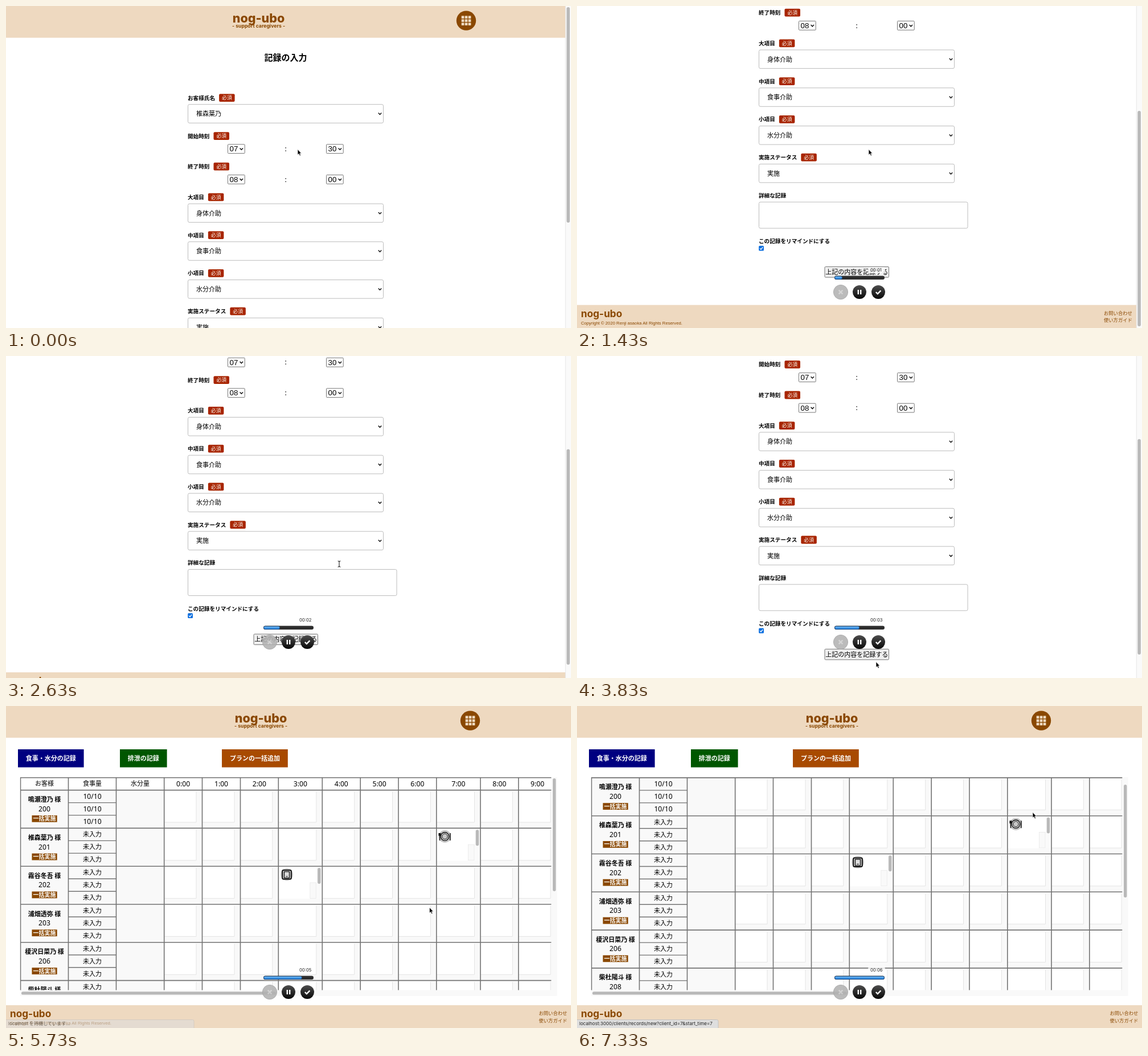
An HTML page that plays this animation: 992x565 px, repeating every 7.36 s.

```html
<!DOCTYPE html>
<html lang="ja">
<head>
<meta charset="utf-8">
<style>
html, body { margin: 0; width: 100%; height: 100%; overflow: hidden; background: #fff; }
svg { display: block; width: 992px; height: 565px; }
text { font-family: "Noto Sans CJK JP", "Noto Sans", sans-serif; white-space: pre; }
.b { font-weight: 700; }
.brand { font-family: Inter, sans-serif; font-weight: 800; }
.ui { font-family: Inter, "Noto Sans CJK JP", sans-serif; }
.latin { font-family: "Liberation Sans", "Noto Sans CJK JP", sans-serif; }
.num { font-family: "Noto Sans", "Noto Sans CJK JP", sans-serif; }
</style>
</head>
<body>
<svg id="stage" viewBox="0 0 992 565" xmlns="http://www.w3.org/2000/svg"></svg>
<script>
const LOOP = 7360, PAGE_SWITCH = 5600;
const BEIGE = '#eed9c0', BROWN = '#8a4800', RULE = '#737373';
const BRAND = 'nog-ubo';

const rect = (x, y, w, h, fill, more = '') =>
  `<rect x="${x}" y="${y}" width="${w}" height="${h}" fill="${fill}" ${more}/>`;
const text = (s, x, y, size, more = '') =>
  `<text x="${x}" y="${y}" font-size="${size}" ${more}>${s}</text>`;
const mid = (s, x, y, size, more = '') => text(s, x, y, size, `text-anchor="middle" ${more}`);
const path = (d, stroke, width = 1, more = '') =>
  `<path d="${d}" fill="none" stroke="${stroke}" stroke-width="${width}" ${more}/>`;
const group = (id, body, more = '') => `<g id="${id}" ${more}>${body}</g>`;
const times = (n, fn) => Array.from({ length: n }, (_, i) => fn(i)).join('');
const chevron = (x, y) => path(`M${x - 2.7} ${y - 1.4}l2.7 2.8 2.7-2.8`, '#111', 1.5);

// Shared header and footer
function header(width, logoX, menuX) {
  return rect(0, 0, width, 55.7, BEIGE) +
    mid(BRAND, logoX, 29, 21.5, `class="brand" fill="${BROWN}"`) +
    mid('- support caregivers -', logoX, 38.3, 8.7, `class="ui b" fill="${BROWN}"`) +
    `<circle cx="${menuX}" cy="25.6" r="17.2" fill="${BROWN}"/>` +
    times(9, i => rect(menuX - 8.3 + i % 3 * 6, 17.3 + Math.floor(i / 3) * 6, 4.7, 4.7, BEIGE));
}
function footer(top, width, right) {
  return rect(0, top, width, 41, BEIGE) + `<g fill="${BROWN}">` +
    text(BRAND, 7, top + 21.2, 17.2, 'class="brand" style="font-weight:700"') +
    text('Copyright © 2020 Renji asaoka All Rights Reserved.', 7, top + 34.4, 7.7, 'class="latin"') +
    text('お問い合わせ', right - 50, top + 17, 8.3) +
    text('使い方ガイド', right - 50, top + 29.6, 8.3) + '</g>';
}

// Entry form
function label(s, y, required = true) {
  const x = 319 + s.length * 9.62 + 7;
  return text(s, 319, y + 3.5, 9.62, 'class="b"') + (required ?
    rect(x, y - 6.8, 27.5, 13.8, '#a82500', 'rx="2"') +
    mid('必須', x + 13.8, y + 3.3, 8.8, 'fill="#fff"') : '');
}
const field = (name, value, y) => label(name, y) +
  rect(319.5, y + 11.7, 343, 32.6, '#fff', 'rx="2.5" stroke="#bcbcbc"') +
  text(value, 334, y + 32.2, 11) + chevron(656.5, y + 28);
const smallSelect = (value, x, y) =>
  rect(x, y - 8, 29.7, 15.8, '#fff', 'rx="1" stroke="#767676"') +
  text(value, x + 3, y + 4.6, 13.3, 'class="latin"') + chevron(x + 23.8, y);
const timeRow = (name, h, m, y) => label(name, y) + smallSelect(h, 389.5, y + 22.8) +
  mid(':', 491, y + 27, 12, 'class="num"') + smallSelect(m, 562.5, y + 22.8);

const form = header(982, 443.5, 808) +
  mid('記録の入力', 491, 95.6, 15, 'class="b"') +
  field('お客様氏名', '椎森葉乃', 161) +
  timeRow('開始時刻', '07', '30', 228) +
  timeRow('終了時刻', '08', '00', 281.6) +
  field('大項目', '身体介助', 335.3) +
  field('中項目', '食事介助', 402) +
  field('小項目', '水分介助', 468.8) +
  field('実施ステータス', '実施', 535.6) +
  label('詳細な記録', 602.3, false) +
  rect(319.5, 614, 366.5, 46, '#fff', 'rx="2.5" stroke="#bcbcbc"') +
  label('この記録をリマインドにする', 682.6, false) +
  rect(319.2, 690.8, 8.8, 8.8, '#0b6fe0', 'rx="1.5"') +
  path('M321.2 695.3l1.8 1.9 3.2-4', '#fff', 1.3) +
  rect(435, 727.5, 112.5, 18.6, '#efefef', 'rx="1.5" stroke="#767676"') +
  mid('上記の内容を記録する', 491.2, 741, 11) +
  footer(794.6, 982, 975);

// Record board
const COLS = [25.5, 109.5, 193.5, 277.7, 344.5, 411.5, 478.3, 555.3, 622.2, 689, 755.8, 833, 899.8, 966.6];
const PEOPLE = [['鳴瀬澄乃', 200], ['椎森葉乃', 201], ['霧谷冬吾', 202],
                ['浦畑透弥', 203], ['榎沢日菜乃', 206], ['柴杜陽斗', 208]];
const TOP = 147.6, ROW = 66.8;
const center = c => (COLS[c] + COLS[c + 1]) / 2;

function emptyCell(x, right, y) {
  const w = right - x - 10.5;
  return rect(x, y, right - x, ROW, '#f9f9f9') + rect(x, y, w, 56.2, '#fff') +
    rect(x, y, right - x, 2, '#fff') +
    path(`M${x} ${y + 56.4}h${w}v-54`, '#e4e4e4');
}
function busyCell(x, right, y, icon) {
  return rect(x, y, right - x, ROW, '#fff') + rect(x, y + 57, right - x, 9.8, '#f9f9f9') +
    rect(right - 10.5, y, 10.5, 57, '#fafafa') +
    rect(right - 21.5, y + 28.8, 10.5, 27.4, '#f9f9f9', 'stroke="#e8e8e8" stroke-width=".8"') +
    rect(right - 8.2, y + 2.8, 5.4, 28, '#b9b9b9', 'rx="2.7"') +
    `<g transform="translate(${x + 14.7} ${y + 14.5})">${icon}</g>`;
}
const mealIcon = '<circle r="10.8" fill="#c4c4c4"/>' +
  '<circle r="7.2" fill="#ddd" stroke="#111" stroke-width="1.4"/>' +
  '<circle r="4.7" fill="#c9c9c9" stroke="#111"/>' +
  path('M-9 -6v13M-10.3 -6v4h2.6v-4M9.4 -6v13', '#111', 1.5);
const boardIcon = '<circle r="10.8" fill="#c4c4c4"/>' +
  rect(-7.8, -7.6, 15.6, 15.6, '#d2d2d2', 'rx="2" stroke="#111" stroke-width="2"') +
  rect(-4.5, -5, 9, 11, '#ddd', 'stroke="#111" stroke-width="1.3"') +
  path('M-1.8 3.4h3.6', '#111');

function personRow([name, room], r) {
  const y = TOP + r * ROW;
  let out = '';
  for (let c = 3; c < 13; c++) {
    const busy = r === 1 && c === 10 ? mealIcon : r === 2 && c === 6 ? boardIcon : null;
    out += (busy ? busyCell : emptyCell)(COLS[c], COLS[c + 1], y, busy);
  }
  out += mid(name + ' 様', 67.5, y + 20.6, 11, 'class="b"') +
    mid(room, 67.5, y + 37.2, 12.2, 'class="num"') +
    rect(45.5, y + 44.3, 44.2, 11.8, BROWN) +
    mid('一括実施', 67.5, y + 53.8, 10, 'class="b" fill="#fff"') +
    times(3, i => mid(r ? '未入力' : '10/10', 151.6, y + 15 + i * 22, r ? 11 : 12.2, 'class="num"')) +
    path(`M109.5 ${y + 22}h84m-84 22h84`, RULE, 1.4);
  return out + path(`M25 ${y}H967`, RULE, 1.6);
}

const table = rect(25, 125, 932, 23, '#fff') +
  ['お客様', '食事量', '水分量'].map((s, i) => mid(s, center(i), 140.3, 11)).join('') +
  times(10, i => mid(i + ':00', center(i + 3), 140.8, 12.2, 'class="num"')) +
  PEOPLE.map(personRow).join('') +
  path('M25 125.8H967', RULE, 1.6) +
  COLS.map(x => path(`M${x} 125V560`, RULE, 1.6)).join('');

const bigButton = (s, x, w, fill) => rect(x, 76, w, 31.6, fill) +
  mid(s, x + w / 2, 95.8, 11, 'class="b" fill="#fff"');

const board = rect(0, 0, 992, 565, '#fff') + header(992, 447.5, 815) +
  bigButton('食事・水分の記録', 21, 115.6, '#000080') +
  bigButton('排泄の記録', 200, 82.6, '#005600') +
  bigButton('プランの一括追加', 379, 115.8, '#a84a00') +
  rect(25, 125, 942.5, 383.8, '#f9f9f9') +
  `<g clip-path="url(#tableView)">${group('table', table)}</g>` +
  rect(960, 127, 5.4, 198, '#b9b9b9', 'id="tableThumb" rx="2.7"') +
  rect(27, 501.2, 447, 5.4, '#b9b9b9', 'rx="2.7"') +
  footer(525, 992, 985.5);

// Browser status line, screen recorder and pointers
const bubble = (id, w, s) => group(id,
  rect(-3, 550.5, w + 3, 18, '#dedede', 'rx="2.5" stroke="#bdbdbd" stroke-width=".8"') +
  text(s, 4, 560.4, 8.1, 'class="ui" fill="#222"'));

const disc = x => `<circle cx="${x}" cy="502" r="12" fill="url(#dark)"/>`;
const recorder =
  rect(511, 458, 30, 11, '#fff', 'rx="3" opacity=".8"') +
  text('00:00', 515, 466.2, 7.7, 'id="clock" class="ui" fill="#222"') +
  rect(452, 473.6, 88, 6.4, '#2d2d2d', 'rx="3.2"') +
  rect(452.5, 474.2, 9, 5.2, 'url(#blue)', 'id="progress" rx="2.6" stroke="#174a85" stroke-width=".8"') +
  '<g opacity=".88"><circle cx="463" cy="502" r="12.6" fill="#b2b2b2" stroke="#a2a2a2"/>' +
  path('M459.6 498.6l6.8 6.8m0-6.8l-6.8 6.8', '#cfcfcf', 2.4) + '</g>' +
  disc(496) + rect(492.6, 498, 2.4, 8, '#fff') + rect(497, 498, 2.4, 8, '#fff') +
  disc(529) + path('M524.8 502l3 3 5.6-5.6', '#fff', 2.3);

document.getElementById('stage').innerHTML = `<defs>
  <clipPath id="tableView"><rect x="24.5" y="125" width="932.8" height="373.5"/></clipPath>
  <linearGradient id="dark" x2="0" y2="1"><stop stop-color="#4d4d4d"/><stop offset=".5" stop-color="#2a2a2a"/><stop offset="1" stop-color="#080808"/></linearGradient>
  <linearGradient id="blue" x2="0" y2="1"><stop stop-color="#7cc4fa"/><stop offset="1" stop-color="#1876d8"/></linearGradient>
</defs>` +
  group('form', group('formPage', form) + rect(982, 0, 10, 565, '#fafafa') +
    path('M982.3 0v565', '#e6e6e6') +
    rect(984.3, 2, 5.6, 378, '#b9b9b9', 'id="pageThumb" rx="2.8"')) +
  group('board', board) +
  bubble('waiting', 330, 'localhost を待機しています...') +
  bubble('link', 248, 'localhost:3000/clients/records/new?client_id=7&amp;start_time=7') +
  group('recorder', recorder) +
  group('arrow', '<path d="M0 0V9.8L2.2 7.8 3.8 11.3 5.5 10.5 3.9 7.2H6.8Z" fill="#000" stroke="#fff" stroke-width=".7"/>') +
  group('beam', path('M-2.4 -5.2Q0 -5.2 0 -3.6V3.6Q0 5.2 -2.4 5.2M2.4 -5.2Q0 -5.2 0 -3.6M0 3.6Q0 5.2 2.4 5.2', '#222', 1.1));

const $ = Object.fromEntries([...document.querySelectorAll('[id]')].map(e => [e.id, e]));
const show = (el, on) => el.setAttribute('visibility', on ? 'visible' : 'hidden');
const move = (el, x, y) => el.setAttribute('transform', `translate(${x} ${y})`);
const ease = u => u * u * (3 - 2 * u);

// Keys are [time, value]; values hold outside the range.
function track(keys, t, curve = u => u) {
  const i = keys.findIndex(k => k[0] > t);
  if (i < 0) return keys[keys.length - 1][1];
  if (i === 0) return keys[0][1];
  const [t0, a] = keys[i - 1], [t1, b] = keys[i];
  return a + (b - a) * curve((t - t0) / (t1 - t0));
}

const PAGE_SCROLL = [[740, 0], [930, 82], [1120, 190], [1290, 249], [1430, 270],
                     [2440, 270], [2630, 239.6], [2900, 222], [3150, 213.2]];
const TABLE_SCROLL = [[6780, 0], [7150, 21.7]];
const POINTER_X = [[1560, 512], [2150, 585], [3150, 585], [3760, 525], [4200, 525], [4450, 527],
                   [4720, 527], [5220, 743.5], [6050, 743.5], [6650, 800]];
const POINTER_Y = [[1560, 251.5], [2150, 365], [3150, 365], [3760, 536.6], [4200, 536.6], [4450, 525],
                   [4720, 525], [5220, 353.5], [6050, 353.5], [6650, 186.5]];

function draw(t) {
  const onBoard = t >= PAGE_SWITCH;
  show($.form, !onBoard);
  show($.board, onBoard);

  const scroll = track(PAGE_SCROLL, t);
  move($.formPage, 0, -scroll);
  $.pageThumb.setAttribute('y', 2 + scroll * 0.674);

  const shift = track(TABLE_SCROLL, t, ease);
  move($.table, 0, -shift);
  $.tableThumb.setAttribute('y', 127 + shift * 0.51);

  $.waiting.setAttribute('opacity', track([[4650, 0], [4750, 1], [5640, 1], [5860, 0]], t));
  $.link.setAttribute('opacity', track([[6350, 0], [6450, 1]], t));

  const elapsed = Math.max(0, t - 380);
  show($.recorder, t >= 350);
  $.clock.textContent = '00:0' + Math.floor(elapsed / 1000);
  $.progress.setAttribute('width', Math.min(87, Math.max(8.5, elapsed / 6950 * 87)));

  const x = track(POINTER_X, t, ease), y = track(POINTER_Y, t, ease);
  const typing = t >= 2080 && t < 3180;
  show($.beam, typing);
  show($.arrow, !typing);
  move(typing ? $.beam : $.arrow, x, y);
}

const start = performance.now();
function tick() {
  draw((performance.now() - start) % LOOP);
  requestAnimationFrame(tick);
}
tick();
</script>
</body>
</html>
```
